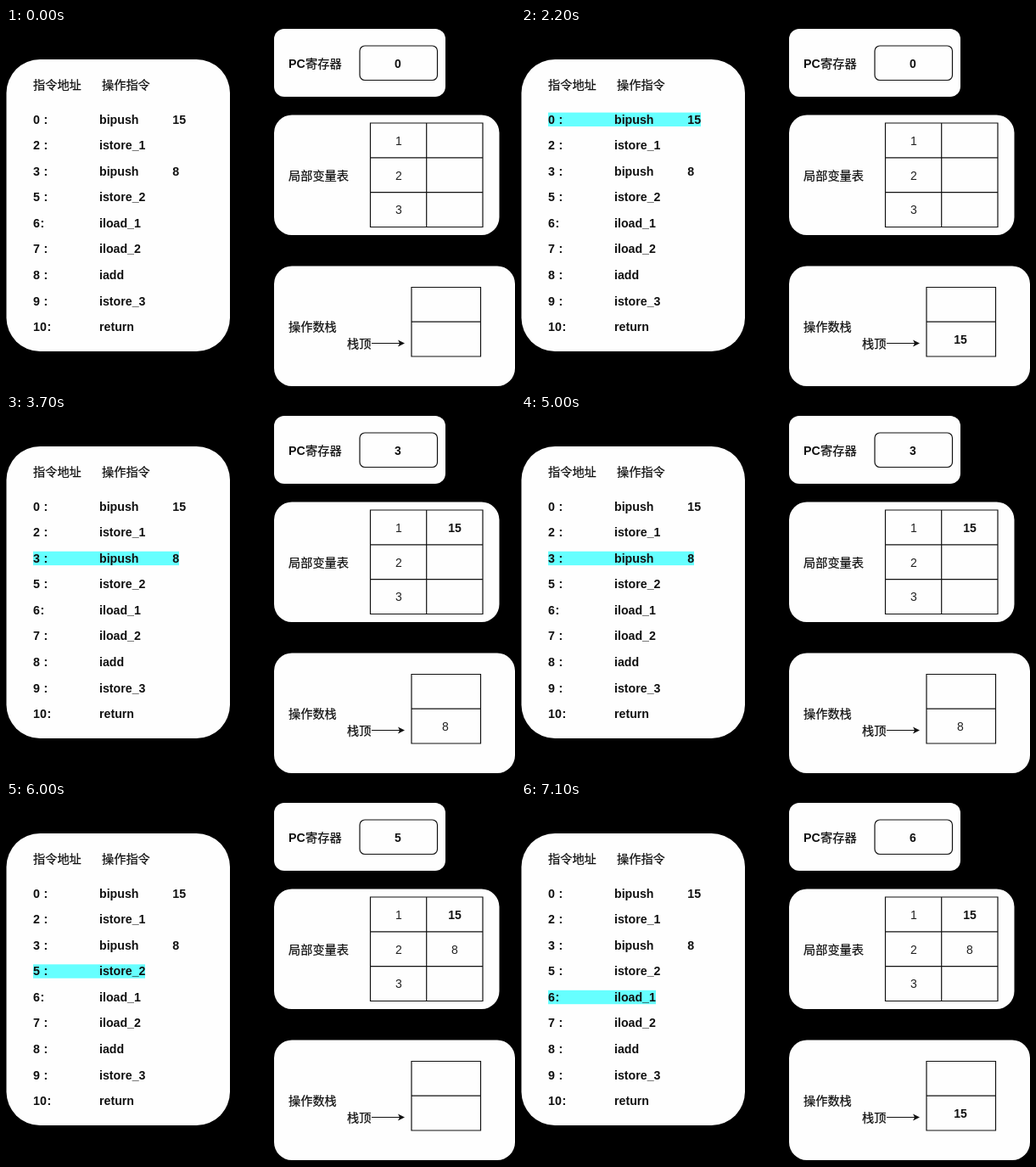
Write an HTML page that moves like this. It is 600 px wide and 423 px high and loops after 8000 ms.

```html
<!DOCTYPE html>
<html lang="zh-CN">
<head>
<meta charset="utf-8">
<title>Bytecode execution</title>
<style>
  html, body { margin: 0; width: 600px; height: 423px; overflow: hidden; background: #000; }
  svg { display: block; }
  text { font: 700 14.2px "Liberation Sans", Arial, sans-serif; fill: #111; }
  .zh text { font: 500 14.2px "Noto Sans CJK SC", "Noto Sans CJK", sans-serif; stroke: #111; stroke-width: .25; }
  .mid text { text-anchor: middle; font-size: 14px; }
  .mid .thin { font-weight: 400; fill: #222; }
  .panel { fill: #fefefe; }
  .lines { fill: none; stroke: #111; stroke-width: 1.2; }
  .mark rect { x: 32px; height: 16.4px; fill: #66ffff; }

  /* One class per step; each is shown only while its instruction runs. */
  .s0, .s1, .s2, .s3, .s4, .s5, .from2, .from4 { animation: 8s step-end infinite; }
  .s0 { animation-name: s0; }
  .s1 { animation-name: s1; }
  .s2 { animation-name: s2; }
  .s3 { animation-name: s3; }
  .s4 { animation-name: s4; }
  .s5 { animation-name: s5; }
  .from2 { animation-name: from2; }
  .from4 { animation-name: from4; }
  @keyframes s0 { 0% { opacity: 1 } 28.75%, 100% { opacity: 0 } }
  @keyframes s1 { 0% { opacity: 0 } 10% { opacity: 1 } 28.75%, 100% { opacity: 0 } }
  @keyframes s2 { 0% { opacity: 0 } 28.75% { opacity: 1 } 46.25%, 100% { opacity: 0 } }
  @keyframes s3 { 0% { opacity: 0 } 46.25% { opacity: 1 } 65%, 100% { opacity: 0 } }
  @keyframes s4 { 0% { opacity: 0 } 65% { opacity: 1 } 83.75%, 100% { opacity: 0 } }
  @keyframes s5 { 0% { opacity: 0 } 83.75%, 100% { opacity: 1 } }
  @keyframes from2 { 0% { opacity: 0 } 28.75%, 100% { opacity: 1 } }
  @keyframes from4 { 0% { opacity: 0 } 65%, 100% { opacity: 1 } }
</style>
</head>
<body>
<svg width="600" height="423" viewBox="0 0 600 423">
  <rect width="600" height="423"/>
  <g class="panel">
    <rect x=".5" y="37" width="263.5" height="344" rx="39.5"/>
    <rect x="316" y="1" width="202" height="80" rx="12"/>
    <rect x="316" y="102.5" width="265.5" height="141.5" rx="21"/>
    <rect x="316" y="280.5" width="284" height="141.5" rx="21"/>
  </g>

  <g class="mark">
    <rect class="s1" y="99.6" width="180"/>
    <rect class="s2" y="130.2" width="132"/>
    <rect class="s3" y="160.7" width="172"/>
    <rect class="s4" y="191.3" width="132"/>
    <rect class="s5" y="221.8" width="127"/>
  </g>
  <g id="program"></g>

  <g class="lines">
    <rect x="417" y="21" width="91.5" height="40.5" rx="6"/>
    <path d="M429.5 112H562V234.5H429.5ZM429.5 152.8H562M429.5 193.6H562M495.7 112V234.5"/>
    <path d="M478 305.5H559.5V387H478ZM478 346.2H559.5M431 371.5H465"/>
  </g>
  <path d="M470 371.5L462 375.5L464 371.5L462 367.5Z" fill="#111"/>

  <g class="zh">
    <text x="32" y="72.4">指令地址</text>
    <text x="113" y="72.4">操作指令</text>
    <text x="353" y="47">寄存器</text>
    <text x="333" y="179.2">局部变量表</text>
    <text x="333" y="357.4">操作数栈</text>
    <text x="402" y="377.2">栈顶</text>
  </g>
  <text x="333" y="46.8">PC</text>

  <g class="mid">
    <text class="s0" x="462" y="46.8">0</text>
    <text class="s2" x="462" y="46.8">2</text>
    <text class="s3" x="462" y="46.8">3</text>
    <text class="s4" x="462" y="46.8">5</text>
    <text class="s5" x="462" y="46.8">6</text>

    <text class="thin" x="463" y="137.8">1</text>
    <text class="thin" x="463" y="178.6">2</text>
    <text class="thin" x="463" y="219.2">3</text>
    <text class="from2" x="529" y="137.8">15</text>
    <text class="thin from4" x="529" y="178.6">8</text>

    <text class="s1" x="518" y="371.8">15</text>
    <text class="thin s3" x="518" y="371.8">8</text>
    <text class="s5" x="518" y="371.8">15</text>
  </g>
</svg>
<script>
  const program = [
    [0, "bipush", 15], [2, "istore_1"], [3, "bipush", 8],
    [5, "istore_2"], [6, "iload_1"], [7, "iload_2"],
    [8, "iadd"], [9, "istore_3"], [10, "return"]
  ];
  const label = (x, y, s) => `<text x="${x}" y="${y}">${s}</text>`;

  document.getElementById("program").innerHTML = program.map(([addr, op, arg], i) => {
    const y = (112.7 + i * 30.55).toFixed(2);
    const colonX = addr === 10 ? 48.5 : addr === 6 ? 40.5 : 44.6;
    return label(32, y, addr) + label(colonX, y, ":") + label(110, y, op) +
      (arg === undefined ? "" : label(196.3, y, arg));
  }).join("");
</script>
</body>
</html>
```
